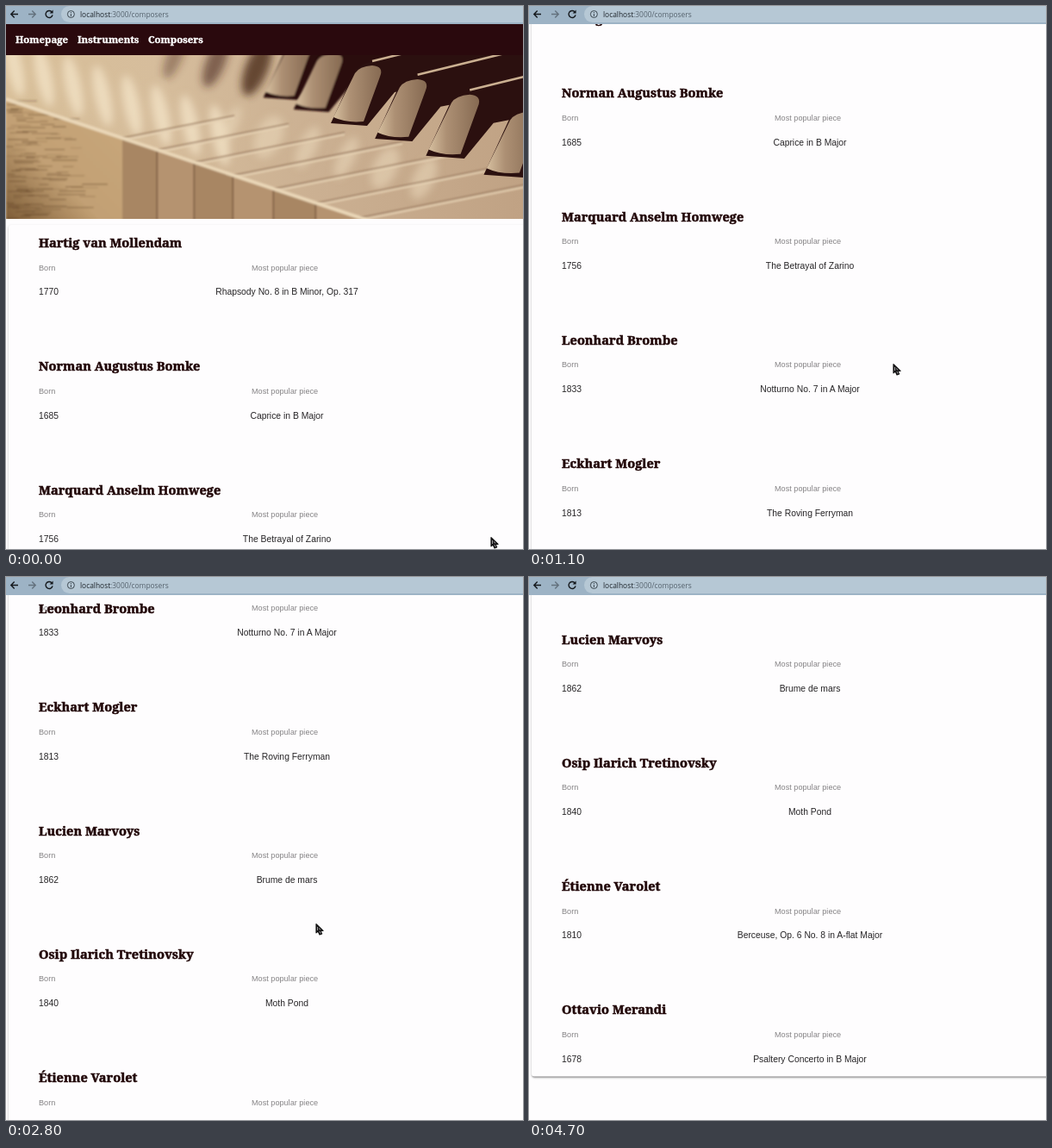
An HTML page for the animation above (5.3 s loop, 600 by 630 pixels).

```html
<!DOCTYPE html>
<html lang="en">
<head>
<meta charset="utf-8">
<title>Composers</title>
<style>
html, body { margin: 0; width: 100%; height: 100%; overflow: hidden; background: #fefdfe; }
#stage { position: absolute; left: 0; top: 0; width: 600px; height: 630px; overflow: hidden; background: #fefdfe; font-family: "Liberation Sans", Arial, sans-serif; }
#stage div, #stage svg { position: absolute; }
#page { left: 0; top: 0; width: 600px; height: 1600px; }
#nav { top: 21px; width: 600px; height: 36px; background: #2a090d; }
.slab { font: 800 14.6px/20px "Noto Serif", serif; white-space: nowrap; -webkit-text-stroke: .5px; color: #210708; }
#nav .slab { top: 7.5px; font-size: 11.4px; color: #fff; -webkit-text-stroke: .4px; }
#photo { left: 0; top: 57px; }
#card { left: 2.5px; top: 254px; width: 620px; height: 1245px; border-radius: 3px; background: #fefdfe; box-shadow: 0 2px 2px -1px rgba(0,0,0,.4), 0 1px 2.5px rgba(0,0,0,.25); }
.label, .value { line-height: 20px; white-space: nowrap; }
.label { font-size: 9.15px; color: #858385; }
.value { font-size: 10.35px; color: #262426; }
.piece { left: 176px; width: 300px; text-align: center; }
#bar { left: 0; top: 0; width: 600px; height: 21px; background: #9db3c5; }
#pill { left: 64px; top: 0; width: 560px; height: 19px; border-radius: 10px; background: #b6c8d5; }
#url { left: 86px; top: 0; font: 8.4px/20px "Open Sans", sans-serif; color: #56636e; white-space: nowrap; }
#url b { font-weight: 400; color: #20272d; }
</style>
</head>
<body>
<div id="stage">
  <div id="page">
    <div id="nav">
      <div class="slab" style="left:11px">Homepage</div>
      <div class="slab" style="left:83px">Instruments</div>
      <div class="slab" style="left:165px">Composers</div>
    </div>
    <svg id="photo" width="600" height="190" viewBox="0 57 600 190">
      <defs>
        <linearGradient id="ivory">
          <stop offset="0" stop-color="#d8bf99"/><stop offset=".3" stop-color="#d6bd9c"/>
          <stop offset=".6" stop-color="#cbb092"/><stop offset="1" stop-color="#c0a284"/>
        </linearGradient>
        <linearGradient id="wood" x1="1" y1="0" x2="0" y2="1">
          <stop offset="0" stop-color="#c9a87c"/><stop offset=".6" stop-color="#c2a074"/>
          <stop offset="1" stop-color="#7c5b36"/>
        </linearGradient>
        <linearGradient id="tip">
          <stop offset="0" stop-color="#d6bf9f"/><stop offset=".35" stop-color="#ad9074"/>
          <stop offset="1" stop-color="#866a52"/>
        </linearGradient>
        <filter id="soft"><feGaussianBlur stdDeviation="5"/></filter>
        <filter id="mild"><feGaussianBlur stdDeviation="1"/></filter>
      </defs>
      <rect y="57" width="600" height="190" fill="url(#ivory)"/>
      <g id="far" filter="url(#soft)"></g>
      <g id="seams" filter="url(#mild)"></g>
      <g id="keys"></g>
      <g id="front" filter="url(#mild)"></g>
    </svg>
    <div id="card"></div>
    <div id="list"></div>
  </div>
  <div id="bar">
    <div id="pill"></div>
    <svg width="90" height="20" fill="none" stroke="#15191d" stroke-width="1.4">
      <path d="M14 9.5H6M9.7 5.6L5.8 9.5L9.7 13.4"/>
      <path d="M26 9.5H34M30.3 5.6L34.2 9.5L30.3 13.4" stroke="#64727e"/>
      <path d="M53 6.7A4 4 0 1 0 54 10.3"/>
      <path d="M54.6 4.6V8.6H50.6Z" fill="#15191d" stroke="none"/>
      <g stroke="#3d4850" stroke-width="1"><circle cx="75.4" cy="9.5" r="4"/><path d="M75.4 8.8V12M75.4 7V8"/></g>
    </svg>
    <div id="url"><b>localhost</b>:3000/composers</div>
  </div>
  <svg id="cursor" width="12" height="16" style="left:0;top:0">
    <path d="M1 .7V10.8L3.2 9L5 13L7.6 12L6 8.4H9Z" fill="#19171a" stroke="#111" stroke-width="1.2" stroke-linejoin="round"/>
    <path d="M2.5 4V8M4 5.5L6.2 7.4M5 9L6.2 11.6" stroke="#ddd" stroke-width=".7"/>
  </svg>
</div>
<script>
const LOOP = 5300, STEP = 100, GAP = 143.3, FIRST = 274;
const PIN = 36, PUSH = 86;
const $ = id => document.getElementById(id);
const loop = (from, to, fn) => Array.from({ length: to - from + 1 }, (_, i) => fn(from + i)).join("");

const composers = [
  ["Hartig van Mollendam", 1770, "Rhapsody No. 8 in B Minor, Op. 317"],
  ["Norman Augustus Bomke", 1685, "Caprice in B Major"],
  ["Marquard Anselm Homwege", 1756, "The Betrayal of Zarino"],
  ["Leonhard Brombe", 1833, "Notturno No. 7 in A Major"],
  ["Eckhart Mogler", 1813, "The Roving Ferryman"],
  ["Lucien Marvoys", 1862, "Brume de mars"],
  ["Osip Ilarich Tretinovsky", 1840, "Moth Pond"],
  ["Étienne Varolet", 1810, "Berceuse, Op. 6 No. 8 in A-flat Major"],
  ["Ottavio Merandi", 1678, "Psaltery Concerto in B Major"]
];

function addText(cls, text, y, x) {
  const el = document.createElement("div");
  el.className = cls;
  el.textContent = text;
  el.style.top = y - 10 + "px";
  if (x !== undefined) el.style.left = x + "px";
  $("list").append(el);
  return el;
}

const headings = composers.map(([name, born, piece], i) => {
  const y = FIRST + i * GAP;
  addText("label", "Born", y + 29.5, 38);
  addText("label", "Most popular piece", y + 29.5, 285);
  addText("value", born, y + 58.3, 38);
  addText("value piece", piece, y + 58.3);
  return addText("slab", name, 0, 38);
});

// The white keys end along one slanted edge.
const edge = x => 108 + .335 * x;
const seamX = i => 135 + 40 * i + i * i;

let seed = 7;
const rand = () => (seed = seed * 16807 % 2147483647) / 2147483647;

function drawPhoto() {
  const streak = (x, y, rx, ry, turn, color, alpha) =>
    `<ellipse rx="${rx}" ry="${ry}" fill="${color}" opacity="${alpha}" transform="translate(${x} ${y}) rotate(${turn})"/>`;
  $("far").innerHTML =
    loop(0, 2, i => streak(195 + 48 * i, 60 + 6 * i, 9 + 2 * i, 26 + 4 * i, 22, "#4a2a1c", .4 + .2 * i)) +
    loop(0, 7, i => streak(10 + 34 * i, edge(34 * i) - 38, 9, 36, -12, "#f5e5c8", .75)) +
    loop(0, 5, i => streak(260 + 45 * i, 140 + 12 * i, 8 + 8 * rand(), 26, 25, "#ecd9bc", .55));

  $("seams").innerHTML = loop(0, 6, i => {
    const x = seamX(i), y = edge(x), run = 130 + 22 * i;
    return `<path d="M${x} ${y}l${run} ${-run * .2}" stroke="#94745a" stroke-width="1.3"/>
      <path d="M${x} ${y + 2.5}l${run} ${-run * .2}" stroke="#e6d1b3" stroke-width="2"/>`;
  });

  // Black keys grow and spread towards the viewer; the rear ones are out of focus.
  $("keys").innerHTML = loop(-2, 3, i => {
    const x = 405 + 48 * i + 4 * i * i, y = 72 + 15 * i + i * i;
    return `<g transform="translate(${x} ${y}) scale(${1 + .03 * i})" ${i < 0 ? 'filter="url(#mild)"' : ""}>
      <path d="M0 3Q8 -6 20 -8L240 -62V-10L46 28L14 67L-28 64Z" fill="#2b100f"/>
      <path d="M20 -8L240 -62" stroke="#cbb091" stroke-width="2.5"/>
      <path d="M0 6Q5 -2 20 -3Q34 -2 29 10L10 62Q-10 64 -25 57Z" fill="url(#tip)"/></g>`;
  });

  const face = i => {
    const x = seamX(i), u = seamX(i + 1);
    return `<path d="M${x} ${edge(x)}L${u} ${edge(u)}V250H${x}Z" fill="${i % 2 ? "#b59370" : "#a88663"}"/>
      <path d="M${u} ${edge(u)}V250" stroke="#6b4a33" stroke-width="2.5"/>`;
  };
  const grain = () => {
    const x = 90 * rand() * rand(), y = edge(x) + rand() * (247 - edge(x));
    return `<path d="M${x} ${y}h${8 + 25 * rand()}" stroke="#5a3c20" stroke-width="1.2" opacity="${.15 + .4 * rand()}"/>`;
  };
  $("front").innerHTML = `<path d="M0 ${edge(0)}L140 ${edge(140)}V250H0Z" fill="url(#wood)"/>` +
    loop(1, 110, grain) + loop(0, 5, face) +
    `<path d="M0 ${edge(0)}L600 ${edge(600)}" stroke="#ead7b8" stroke-width="4"/>`;
}
drawPhoto();

// Key points: time, then values.
const scrollKeys = [[500, 0], [700, 77], [1100, 317], [2100, 553], [2800, 697], [3700, 888.5], [3800, 888.5], [4100, 919.5]];
const cursorKeys = [[0, 562, 616], [700, 450, 409], [1100, 422, 415], [2100, 407, 414], [2800, 359, 402],
  [3600, 349, 400], [4500, 349, 400], [4600, 519, 404]];

function at(keys, t) {
  const n = keys.findIndex(k => k[0] >= t);
  if (n <= 0) return keys.at(n).slice(1);
  const a = keys[n - 1], b = keys[n], p = (t - a[0]) / (b[0] - a[0]);
  return a.slice(1).map((v, i) => v + (b[i + 1] - v) * p);
}

function draw(now) {
  const t = Math.floor(now % LOOP / STEP) * STEP;
  const [scroll] = at(scrollKeys, t);
  $("page").style.transform = `translateY(${-scroll}px)`;
  // Headings pin below the toolbar until their section ends.
  headings.forEach((el, i) => {
    const y = FIRST + i * GAP - scroll;
    const pinned = Math.max(y, Math.min(PIN, y + GAP - PUSH));
    el.style.top = pinned + scroll - 10 + "px";
  });
  const [x, y] = at(cursorKeys, t);
  $("cursor").style.transform = `translate(${x}px, ${y}px)`;
  $("cursor").style.visibility = t < 4700 ? "visible" : "hidden";
}

const start = performance.now();
function tick() {
  draw(performance.now() - start);
  requestAnimationFrame(tick);
}
tick();
</script>
</body>
</html>
```
